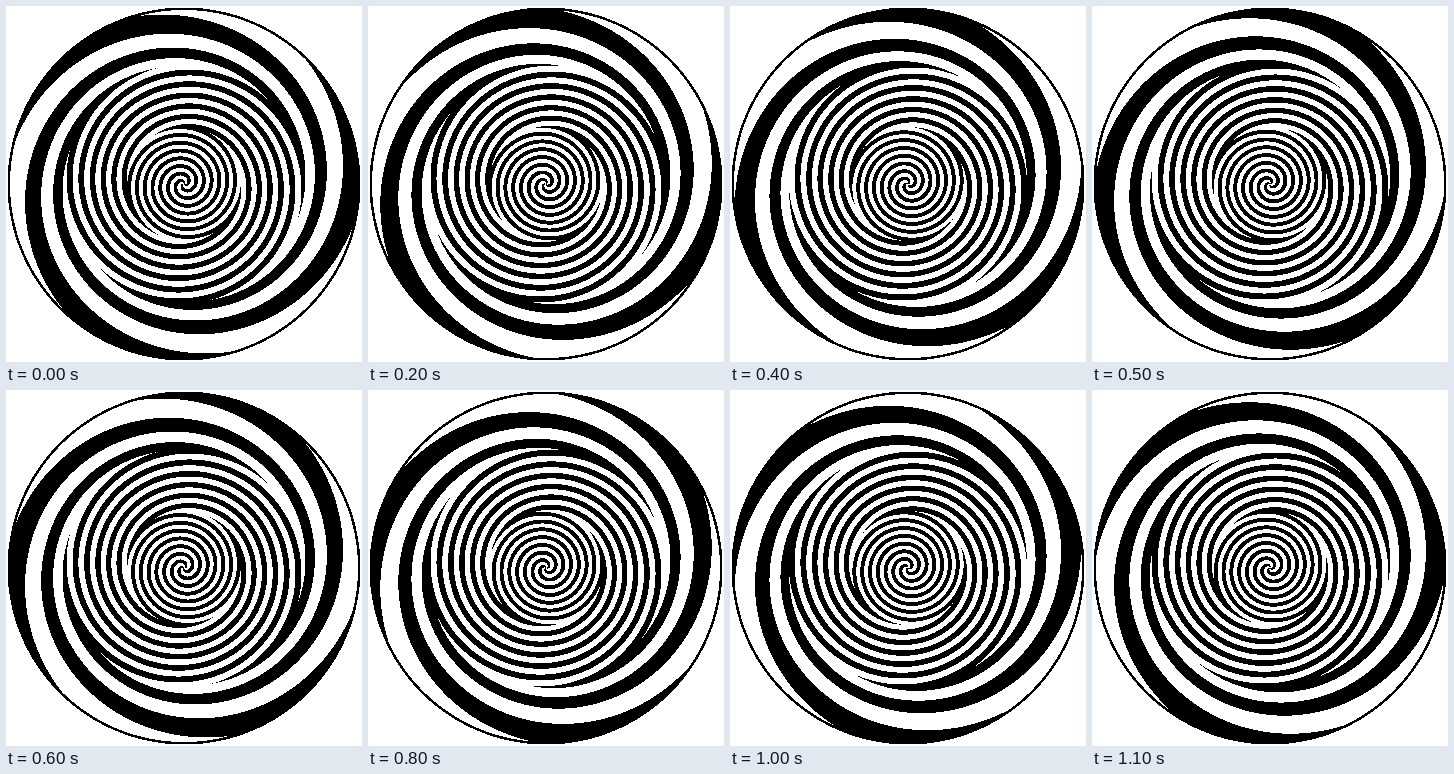
Recreate the animation shown at these times as an HTML page with a canvas. Size 356 by 356 pixels, loop 1.2 s.

```html
<!DOCTYPE html>
<html lang="en">
<head>
<meta charset="utf-8">
<title>Spinning spiral</title>
<style>
html, body { margin: 0; width: 100%; height: 100%; overflow: hidden; background: #fff; }
canvas { display: block; width: 356px; height: 356px; }
</style>
</head>
<body>
<canvas id="stage" width="356" height="356"></canvas>
<script>
const SIZE = 356, MID = 178;
const RIM = 176.5, EDGE = 174;     // outline between these radii
const RING_A = 119, RING_B = 57;   // circles where the twist reverses
const LOOP = 1200, STEP = 100, TURN = 120;
const START = 139.6, START_R = 172;

const ctx = document.getElementById('stage').getContext('2d');
const image = ctx.createImageData(SIZE, SIZE);
const pixels = new Uint32Array(image.data.buffer);
const BLACK = 0xff000000, WHITE = 0xffffffff;

const inv = r => 1 / (r * r);
const mod = (a, n) => ((a % n) + n) % n;

// Twist in degrees: three continuous zones, the middle one winding backwards
const twistA = 237;
const outer = r => twistA * (inv(r) - inv(START_R)) / (inv(RING_A) - inv(START_R));
const middle = r => {
  const d = RING_A - r;
  return twistA - 9.85 * d - 0.018 * d * d;
};
const inner = r => middle(RING_B) + 15.3 * (RING_B - r);
const twist = r => r > RING_A ? outer(r) : r > RING_B ? middle(r) : inner(r);

// Band phase of each pixel inside the outline
const phase = new Float32Array(SIZE * SIZE).fill(NaN);
pixels.fill(WHITE);
for (let y = 0, i = 0; y < SIZE; y++) {
  for (let x = 0; x < SIZE; x++, i++) {
    const dx = x + 0.5 - MID, dy = y + 0.5 - MID;
    const r = Math.hypot(dx, dy);
    if (r < EDGE) phase[i] = twist(r) - Math.atan2(dy, dx) * 180 / Math.PI + START;
    else if (r < RIM) pixels[i] = BLACK;
  }
}

let shown = -1;
function draw(now) {
  const step = Math.floor((now % LOOP) / STEP);
  if (step === shown) return;
  shown = step;
  const angle = step * STEP / LOOP * TURN;
  for (let i = 0; i < phase.length; i++) {
    if (isNaN(phase[i])) continue;
    pixels[i] = mod(phase[i] + angle, TURN) < TURN / 2 ? BLACK : WHITE;
  }
  ctx.putImageData(image, 0, 0);
}

let origin = null;
function tick(now) {
  if (origin === null) origin = now;
  draw(now - origin);
  requestAnimationFrame(tick);
}
draw(0);
requestAnimationFrame(tick);
</script>
</body>
</html>
```
